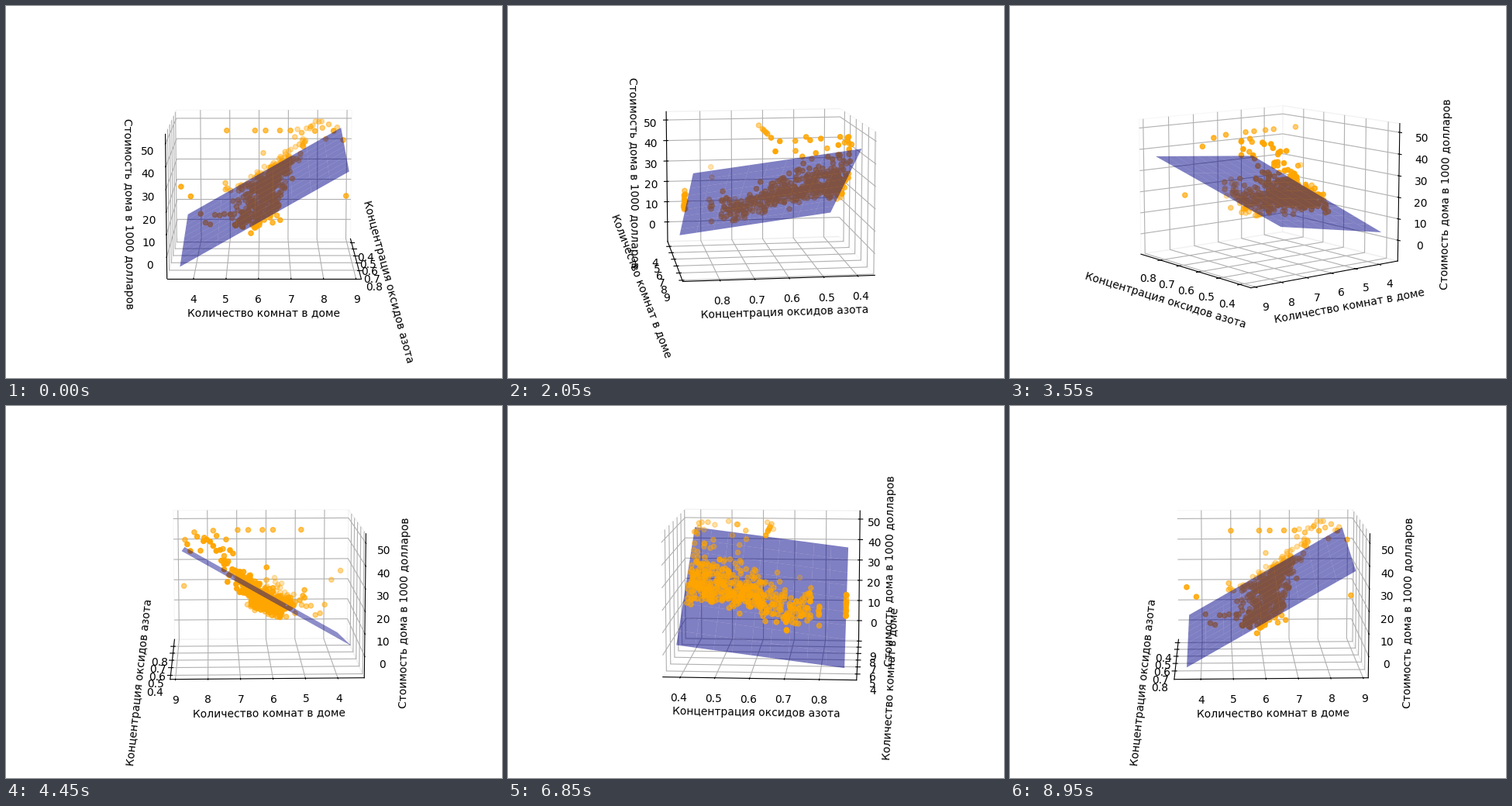
Recreate the animation shown at these times as a matplotlib script. Size 640 px wide and 480 px high, loop 9 s.

```python
import numpy as np
import matplotlib.pyplot as plt
from matplotlib.animation import FuncAnimation

FRAMES = 180
STEP = 2  # degrees per frame
TOWNS, HOMES = 80, 6
NOX = (.385, .871)
ROOMS = (3.561, 8.78)
rng = np.random.default_rng(11)


def suburbs():
    """Homes of one town share their air; rooms and price follow trends."""
    share = np.linspace(0, 1, TOWNS)
    town = np.interp(share, [0, .25, .5, .75, .85, .96, .97, 1],
                     [.392, .449, .535, .624, .693, .77, .871, .871])
    nox = np.repeat(town, HOMES)
    mean = np.interp(nox, [.4, .46, .55, .77, .871], [6.5, 6.5, 6.2, 6.0, 5.5])
    mean += np.repeat(rng.normal(0, .2, TOWNS), HOMES)
    spread = np.interp(nox, [.4, .7, .871], [.47, .4, .3])
    rooms = np.clip(rng.normal(mean, spread), 4.9, 8.4)
    offset = np.interp(nox, [.4, .5, .6, .7, .871], [1, 1, -2, -8, -3])
    d = rooms - 6.2
    price = 21.3 + 7.5 * d + 5 * d**2 + offset + rng.normal(0, 2.4, nox.size)
    return nox, rooms, np.clip(price, 5, 50)


def villas(n=16):
    rooms = np.linspace(7.2, 8.72, n)
    return rng.uniform(.4, .65, n), rooms, np.minimum(rng.uniform(43, 54, n), 50)


def cottages(n=6):
    return np.full(n, .7), np.linspace(4.14, 4.9, n), rng.uniform(7, 14, n)


def lofts():
    rooms = np.array([4.97, 5.88, 6.22, 6.68, 7.02])
    return np.full(rooms.size, .635), rooms, np.full(rooms.size, 50)


def strays():
    return np.transpose([(.77, 3.561, 27.5), (.77, 3.863, 23.1),
                         (.718, 8.78, 21.9), (.488, 6.144, 36.2)])


def plane(nox, rooms):
    return -18.206 + 8.157 * rooms - 18.971 * nox


def limits(low, high):
    pad = (high - low) * .05
    edge = (high - low + 2 * pad) / 48
    return low - pad - edge, high + pad + edge


fig = plt.figure(figsize=(6.4, 4.8), dpi=100)
ax = fig.add_subplot(projection='3d')

groups = [suburbs(), villas(), cottages(), lofts(), strays()]
ax.scatter(*np.hstack(groups), color='orange')

X, Y = np.meshgrid(np.linspace(*NOX, 10), np.linspace(*ROOMS, 10))
Z = plane(X, Y)
ax.plot_surface(X, Y, Z, color='blue', alpha=.5)

ax.set(xlim=limits(*NOX), ylim=limits(*ROOMS), zlim=limits(Z.min(), 50),
       xticks=np.arange(4, 9) / 10, yticks=range(4, 10),
       zticks=range(0, 60, 10),
       xlabel='Концентрация оксидов азота',
       ylabel='Количество комнат в доме',
       zlabel='Стоимость дома в 1000 долларов')
for axis in (ax.xaxis, ax.yaxis, ax.zaxis):
    axis.pane.fill = False


def update(i):
    ax.view_init(elev=10, azim=STEP * i)
    return ()


anim = FuncAnimation(fig, update, frames=FRAMES, interval=50,
                     init_func=lambda: update(0), repeat=True, repeat_delay=0)
plt.show()
```
